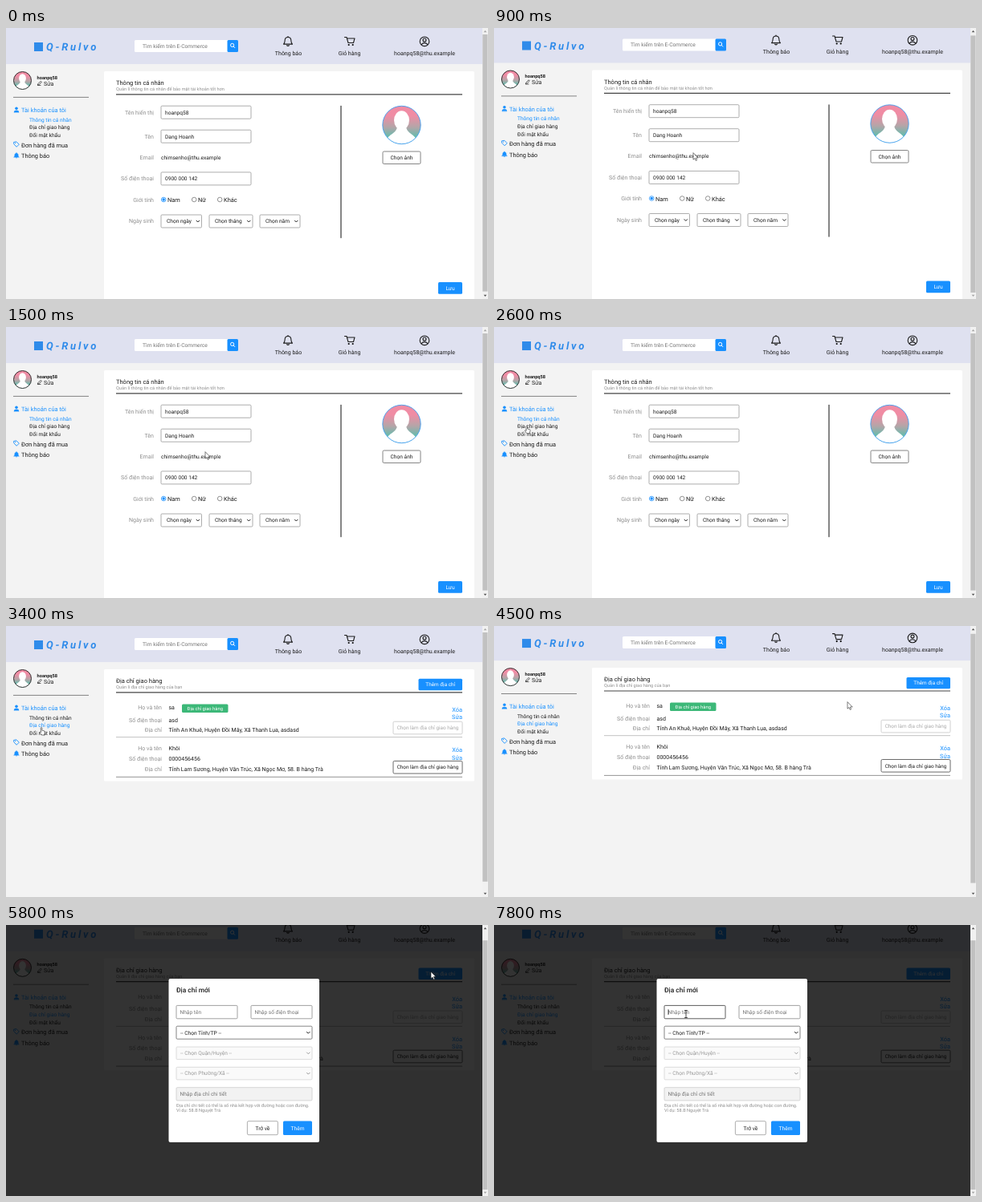
Write an HTML page that moves like this. It is 600 px wide and 338 px high and loops after 8000 ms.

```html
<!DOCTYPE html>
<html lang="vi">
<head>
<meta charset="utf-8">
<title>Tài khoản</title>
<style>
html, body { margin: 0; width: 100%; height: 100%; overflow: hidden; background: #f3f3f3; }
svg { display: block; width: 600px; height: 338px; }
text { font-family: Roboto, sans-serif; text-rendering: geometricPrecision; white-space: pre; }
</style>
</head>
<body>
<svg id="stage" viewBox="0 0 600 338" xmlns="http://www.w3.org/2000/svg"></svg>
<script>
const BLUE = '#1890ff', INK = '#1c1c1c', GREY = '#8f8f8f';
const USER = 'hoanpq58';

const text = (x, y, str, size = 7, fill = INK, anchor = 'start', extra = '') =>
  `<text x="${x}" y="${y}" font-size="${size}" fill="${fill}" text-anchor="${anchor}" ${extra}>${str}</text>`;
const box = (x, y, w, h, fill = '#fff', stroke = 'none', r = 1.5, id = '') =>
  `<rect ${id && `id="${id}"`} x="${x}" y="${y}" width="${w}" height="${h}" rx="${r}" fill="${fill}" stroke="${stroke}" stroke-width=".8"/>`;
const path = (d, stroke = INK, width = 1, fill = 'none') =>
  `<path d="${d}" fill="${fill}" stroke="${stroke}" stroke-width="${width}" stroke-linejoin="round" stroke-linecap="round"/>`;
const rule = (x1, x2, y, stroke, width) =>
  `<path d="M${x1} ${y}H${x2}" stroke="${stroke}" stroke-width="${width}"/>`;
const at = (x, y, scale, body) => `<g transform="translate(${x} ${y}) scale(${scale})">${body}</g>`;

const button = (x, y, w, h, label, fill, stroke, color, size = 6.6) =>
  box(x, y, w, h, fill, stroke) + text(x + w / 2, y + h / 2 + size * .35, label, size, color, 'middle');
const field = (x, y, w, h, str, pad, color = INK, stroke = '#999', fill = '#fff', id = '') =>
  box(x, y, w, h, fill, stroke, 1.2, id) + text(x + pad, y + h / 2 + 2.3, str, 6.6, color);
const select = (x, y, w, h, str, pad, color, stroke, fill) =>
  field(x, y, w, h, str, pad, color, stroke, fill) +
  path(`M${x + w - 6.5} ${y + h / 2 - .8}l1.8 1.8l1.8 -1.8`, color);

const bell = (x, y, scale, stroke, fill) => at(x, y, scale,
  path('M-5.5 3.6C-3.7 2-4 .2-3.8-1.5C-3.4-6.2 3.4-6.2 3.8-1.5C4 .2 3.7 2 5.5 3.6Z', stroke, 1.1, fill) +
  path('M-1.3 5.2Q0 6.4 1.3 5.2M0-5.2V-6', stroke, 1.2));
const cart = path('M421.5 11.5H424L426 18.5H432.5L434 13H424.6', INK, 1.1) +
  '<circle cx="426.7" cy="21" r="1.1"/><circle cx="431.7" cy="21" r="1.1"/>';
const person = '<circle cx="521" cy="16.8" r="5.8" fill="none" stroke="#1c1c1c" stroke-width="1.1"/>' +
  '<circle cx="521" cy="15" r="2" fill="none" stroke="#1c1c1c" stroke-width="1.1"/>' +
  path('M517 20.6Q521 16.8 525 20.6', INK, 1.1);

const avatar = (x, y, r, border) => at(x, y, r, `
  <circle r="1" fill="url(#sky)"/>
  <g clip-path="url(#disc)" fill="#fff"><ellipse cy="-.25" rx=".4" ry=".5"/>
  <path d="M-.82 1C-.8 .4-.24 .55-.22 0H.22C.24 .55 .8 .4 .82 1Z"/></g>
  <circle r="1" fill="none" stroke="${border}" stroke-width="${.9 / r}"/>`);

const header = box(0, 0, 593, 45, '#dfe1f0', 'none', 0) +
  box(35, 18, 11, 11, '#2f8bea', 'none', 0) +
  text(50, 28, 'Q-Rulvo', 13, '#2f8bea', 'start', 'font-weight="700" font-style="italic" letter-spacing="2.8"') +
  box(160, 15, 117, 15) + text(170, 24.8, 'Tìm kiếm trên E-Commerce', 6.7, '#757575') +
  box(275.5, 15, 13.5, 15, BLUE) +
  '<circle cx="281.6" cy="21.4" r="2.1" fill="none" stroke="#fff"/>' + path('M283.2 23L284.8 24.6', '#fff') +
  bell(351, 16.5, 1, INK, 'none') + cart + person +
  text(351.5, 33.5, 'Thông báo', 7, INK, 'middle') + text(427.5, 33.5, 'Giỏ hàng', 7, INK, 'middle') +
  text(521, 33.5, USER + '@thu.example', 7, INK, 'middle');

const sidebar = avatar(20.5, 65.5, 11, '#222') +
  text(38.5, 63.6, USER, 5.7, INK, 'start', 'font-weight="700"') +
  path('M39.5 71.5H43M40 69.5L43.2 66.3L44.4 67.5L41.2 70.6L39.7 71Z', INK, .7) + text(47, 71.6, 'Sửa', 7) +
  rule(9, 103, 86.4, '#777', .9) +
  `<circle cx="13" cy="100.2" r="1.8" fill="${BLUE}"/>` + path('M10 105Q10 102.8 13 102.8T16 105Z', BLUE, .5, BLUE) +
  text(19, 105.3, 'Tài khoản của tôi', 7.4, BLUE) +
  text(29, 116.5, 'Thông tin cá nhân', 6.6, INK, 'start', 'id="linkProfile"') +
  text(29, 126.3, 'Địa chỉ giao hàng', 6.6, INK, 'start', 'id="linkAddress"') +
  text(29, 136, 'Đổi mật khẩu', 6.6) +
  path('M10 142.3L13 141.8L16.3 145.2L13.2 148.3L10 145Z', BLUE, .9) +
  `<circle cx="11.6" cy="143.6" r=".6" fill="${BLUE}"/>` + text(19, 148.5, 'Đơn hàng đã mua', 7.4) +
  bell(13, 159, .55, BLUE, BLUE) + text(19, 162, 'Thông báo', 7.4);

const heading = (title, note) => text(137, 71, title, 7.5) + text(137, 78.2, note, 5.62, GREY) +
  rule(137, 568, 82.9, '#444', 1.2);
const label = (x, y, str) => text(x, y, str, 7.05, GREY, 'end');
const radio = (x, str, on) =>
  `<circle cx="${x}" cy="214" r="2.8" fill="#fff" stroke="${on ? BLUE : '#777'}" stroke-width=".8"/>` +
  (on ? `<circle cx="${x}" cy="214" r="1.7" fill="${BLUE}"/>` : '') + text(x + 4.8, 217, str, 7.4);

const profile = box(122, 54, 461, 300) +
  heading('Thông tin cá nhân', 'Quản lí thông tin cá nhân để bảo mật tài khoản tốt hơn') +
  ['Tên hiển thị', 'Tên', 'Email', 'Số điện thoại', 'Giới tính', 'Ngày sinh']
    .map((s, i) => label(184, [107.8, 137.8, 163.8, 190.2, 216.8, 243.4][i], s)).join('') +
  field(193, 97.2, 112, 16, USER, 5) + field(193, 127.2, 112, 16, 'Dang Hoanh', 5) +
  text(193, 163.8, 'chimsenho@thu.example', 6.6) + field(193, 179.9, 112, 16, '0900 000 142', 5) +
  radio(196.2, 'Nam', true) + radio(234.2, 'Nữ') + radio(266.2, 'Khác') +
  select(193, 233, 50.5, 16, 'Chọn ngày', 7) + select(253, 233, 54, 16, 'Chọn tháng', 7) +
  select(316, 233, 50, 16, 'Chọn năm', 7) +
  path('M417 97.5V261.5', '#444', 1.3) + avatar(492.5, 121, 23.7, '#3f9df0') +
  button(469, 154, 47, 15.5, 'Chọn ảnh', '#fff', '#666', INK) +
  button(538, 317, 30, 14.8, 'Lưu', BLUE, 'none', '#fff');

const entry = (name, phone, place, [nameY, phoneY, placeY, linkY, buttonY, ruleY], chosen) =>
  label(194, nameY, 'Họ và tên') + text(202.5, nameY, name) +
  label(194, phoneY, 'Số điện thoại') + text(202.5, phoneY, phone) +
  label(194, placeY, 'Địa chỉ') + text(202.5, placeY, place) +
  text(568, linkY, 'Xóa', 7.4, BLUE, 'end') + text(568, linkY + 9.3, 'Sửa', 7.4, BLUE, 'end') +
  button(482, buttonY, 86, 15.6, 'Chọn làm địa chỉ giao hàng', '#fff', chosen ? '#c4c4c4' : '#444', chosen ? '#aaa' : INK, 6.35) +
  rule(137, 568, ruleY, chosen ? '#bbb' : '#888', .9);
const address = box(122, 54, 461, 139.5) +
  heading('Địa chỉ giao hàng', 'Quản lí địa chỉ giao hàng của bạn') +
  button(513.5, 65.8, 54.5, 14.4, 'Thêm địa chỉ', BLUE, 'none', '#fff', 6.4) +
  entry('sa', 'asd', 'Tỉnh An Khuê, Huyện Đồi Mây, Xã Thanh Lụa, asdasd',
    [104, 119.6, 132.3, 106.9, 119.2, 138.6], true) +
  button(219, 97.4, 57.5, 10.5, 'Địa chỉ giao hàng', '#3cb878', 'none', '#fff', 5.8) +
  entry('Khôi', '0000456456', 'Tỉnh Lam Sương, Huyện Vân Trúc, Xã Ngọc Mơ, 58. B hàng Trà',
    [155.1, 168.4, 181.4, 157.4, 168.4, 188.3], false);

const modal = '<path d="M0 0H593V338H0Z" opacity=".8"/>' + box(202.5, 67, 187.5, 204, '#fff', 'none', 2) +
  text(212, 84.2, 'Địa chỉ mới', 8.4, INK, 'start', 'font-weight="500"') +
  field(212, 100.4, 76, 16.4, 'Nhập tên', 4.5, '#757575', '#888', '#fff', 'nameField') +
  field(305, 100.4, 76, 16.4, 'Nhập số điện thoại', 4.5, '#757575', '#888') +
  select(212, 126.2, 169, 16, '-- Chọn Tỉnh/TP --', 5, INK, '#666') +
  select(212, 152, 169, 15.6, '-- Chọn Quận/Huyện --', 5, '#999', '#d4d4d4', '#fafafa') +
  select(212, 177.3, 169, 15.6, '-- Chọn Phường/Xã --', 5, '#999', '#d4d4d4', '#fafafa') +
  field(212, 202.7, 169, 16.2, 'Nhập địa chỉ chi tiết', 4.5, '#757575', '#ccc', '#f2f2f2') +
  text(212, 226.5, 'Địa chỉ chi tiết có thể là số nhà kết hợp với đường hoặc con đường.', 5.62, GREY) +
  text(212, 233.2, 'Ví dụ: 58.B Nguyệt Trà', 5.62, GREY) +
  button(300.4, 244.7, 38, 17, 'Trở về', '#fff', '#999', INK) +
  button(345, 244.5, 36, 17.4, 'Thêm', BLUE, 'none', '#fff') +
  '<path id="caret" d="M217 105.2V112" stroke="#000" stroke-width=".7"/>';

const scrollbar = box(593, 0, 7, 338, '#f1f1f1', 'none', 0) + box(593.3, 8, 6.2, 320, '#c1c1c1', 'none', 0, 'thumb') +
  '<path id="up" d="M594.7 5.2L596.5 3L598.3 5.2Z"/><path id="down" d="M594.7 332.8L596.5 335L598.3 332.8Z"/>';

const pointers = {
  arrow: path('M0 0V8.2L1.9 6.5L3.2 9.4L4.6 8.8L3.3 6H5.8Z', '#222', .6, '#fff'),
  hand: path('M1.4 .9Q2.3-.2 2.9 1V4.2L5.9 5Q6.7 5.5 6.4 7L5.7 10H2.3L-.2 6.6Q-.2 5.4 1.4 6.3Z', '#222', .6, '#fff'),
  beam: path('M-1.5-4.5H1.5M0-4.5V4.5M-1.5 4.5H1.5', '#222', .8)
};

const stage = document.getElementById('stage');
stage.innerHTML = `<defs>
  <linearGradient id="sky" x2="0" y2="1"><stop offset=".25" stop-color="#f08ca4"/><stop offset=".55" stop-color="#b5a5a8"/><stop offset=".85" stop-color="#58bfae"/></linearGradient>
  <clipPath id="disc"><circle r="1"/></clipPath></defs>
  <path d="M0 0H600V338H0Z" fill="#f3f3f3"/>
  <g id="page">${header}${sidebar}<g id="profile">${profile}</g><g id="address">${address}</g></g>
  <g id="modal">${modal}</g>${scrollbar}
  <g id="cursor">${Object.entries(pointers).map(([k, v]) => `<g id="${k}">${v}</g>`).join('')}</g>`;

const el = Object.fromEntries([...stage.querySelectorAll('[id]')].map(e => [e.id, e]));
const show = (id, on) => el[id].setAttribute('display', on ? 'inline' : 'none');
const set = (id, name, value) => el[id].setAttribute(name, value);

// [ms, x, y] of the pointer
const route = [
  [0, 248, 156], [1500, 248, 156], [1800, 200, 137], [2300, 20, 105], [2700, 42, 126], [3700, 42, 126],
  [4500, 440, 95], [5100, 514.5, 64], [5400, 529, 58.5], [5900, 529, 58.5],
  [6500, 246, 108], [6900, 238, 110.5], [7100, 238, 110.5], [7200, 239, 111], [8000, 239, 111]
];
const track = (keys, t) => {
  const i = keys.findIndex(k => k[0] > t), a = keys[i - 1], b = keys[i];
  const u = (t - a[0]) / (b[0] - a[0]), e = u * u * (3 - 2 * u);
  return a.slice(1).map((v, j) => v + (b[j + 1] - v) * e);
};
const scrolls = [[0, 0], [400, 0], [600, 1.5], [1100, 1.5], [1300, 0], [4400, 0], [4800, 12.2], [8001, 12.2]];

function draw(t) {
  const onAddress = t >= 3000, max = onAddress ? 12.2 : 1.5;
  const [scroll] = track(scrolls, t), [x, y] = track(route, t), unit = 322 / (338 + max);
  set('page', 'transform', `translate(0 ${-scroll})`);
  set('thumb', 'y', 8 + scroll * unit);
  set('thumb', 'height', 338 * unit);
  set('up', 'fill', scroll > 0 ? '#505050' : '#a3a3a3');
  set('down', 'fill', scroll < max ? '#505050' : '#a3a3a3');
  show('profile', !onAddress);
  show('address', onAddress);
  set('linkProfile', 'fill', onAddress ? INK : BLUE);
  set('linkAddress', 'fill', onAddress ? BLUE : INK);
  show('modal', t >= 5700);
  set('nameField', 'stroke', t >= 6800 ? '#333' : '#888');
  show('caret', t >= 6800 && (t - 6800) % 1000 < 500);
  const kind = t >= 6500 ? 'beam' : (t >= 2300 && t < 3800) || (t >= 5000 && t < 5700) ? 'hand' : 'arrow';
  for (const k in pointers) show(k, k === kind);
  show('cursor', t >= 100);
  set('cursor', 'transform', `translate(${x} ${y})`);
}

const start = performance.now();
function tick() {
  const t = Math.max(0, performance.now() - start) % 8000;
  draw(Math.floor(t / 100) * 100);
  requestAnimationFrame(tick);
}
tick();
</script>
</body>
</html>
```
